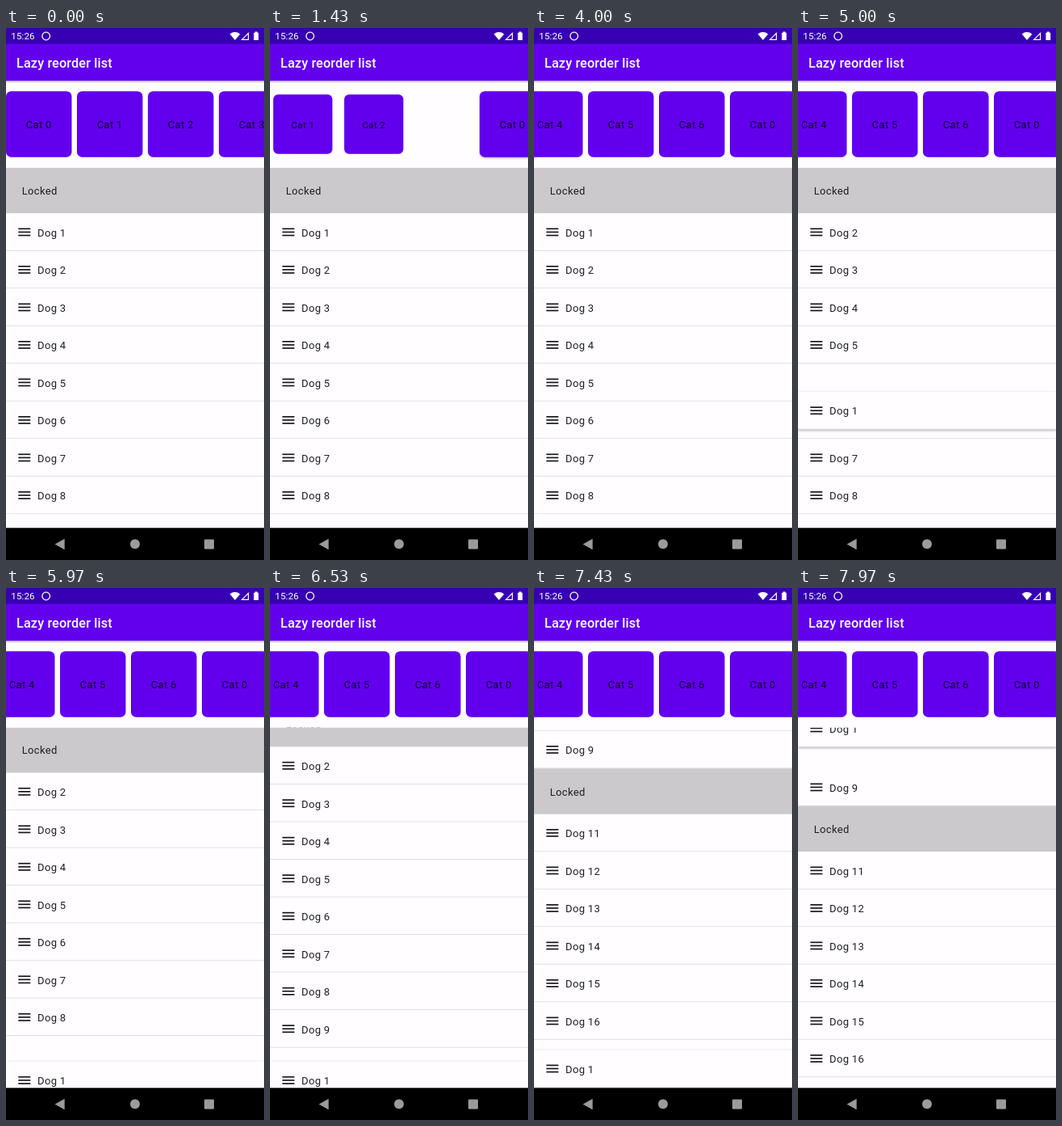
These frames come from a looping animation (320 by 658 pixels, 8 s). An HTML page:

```html
<!DOCTYPE html>
<html lang="en">
<head>
<meta charset="utf-8">
<title>Lazy reorder list</title>
<style>
  html, body { margin: 0; width: 100%; height: 100%; overflow: hidden; background: #000; }
  svg { display: block; width: 100vw; height: 100vh; }
  text { font: 400 13px Roboto, "Noto Sans", sans-serif; letter-spacing: .35px; fill: #1f1e21; }
  .cat text { text-anchor: middle; fill: #0d0020; }
  .title { font-size: 16.3px; font-weight: 500; letter-spacing: .12px; fill: #fff; }
  .clock { font-size: 11.6px; letter-spacing: .1px; fill: #fff; }
</style>
</head>
<body>
<svg viewBox="0 0 320 658" preserveAspectRatio="none">
  <defs>
    <clipPath id="view"><rect y="172.8" width="320" height="445.5"/></clipPath>
    <linearGradient id="fall" x2="0" y2="1">
      <stop stop-color="#000" stop-opacity=".22"/>
      <stop offset="1" stop-color="#000" stop-opacity="0"/>
    </linearGradient>
  </defs>
  <rect width="320" height="620" fill="#fffdff"/>
  <g id="cats"></g>
  <g clip-path="url(#view)"><g id="dogs"></g></g>

  <rect y="65.2" width="320" height="3.5" fill="url(#fall)"/>
  <rect y="19" width="320" height="46.3" fill="#6200ee"/>
  <rect width="320" height="19.6" fill="#3700b3"/>
  <text class="title" x="13" y="49">Lazy reorder list</text>
  <text class="clock" x="6.3" y="14.2">15:26</text>
  <circle cx="49.7" cy="10" r="4.8" fill="none" stroke="#fff" stroke-width="1.3"/>
  <g fill="#fff">
    <path d="M277.6 7.4Q284 2.6 290.4 7.4L284 15Z"/>
    <path d="M301.2 5V15H291.2Z M300 7.9L294 13.8H300Z" fill-rule="evenodd"/>
    <path d="M309 4.6h2.6v1.1h1.6v9.3h-5.8V5.700h1.600z"/>
  </g>

  <rect y="618.300" width="320" height="40" fill="#000"/>
  <g fill="#9b9b9b">
    <path d="M60.600 638.400L72.700 631.700V645.200Z"/>
    <circle cx="160" cy="638.300" r="6"/>
    <rect x="246" y="632.400" width="12" height="12" rx=".8"/>
  </g>
</svg>
<script>
const LOOP = 8000;
const CAT = 81.5, PITCH = 88;
const TOP = 172.8, ROW = 46.5, LOCK = 56.5;

const clamp = p => Math.min(1, Math.max(0, p));
const part = (t, a, b) => clamp((t - a) / (b - a));
const smooth = p => p * p * (3 - 2 * p);
const easeOut = p => 1 - (1 - p) ** 2;

// Rows of [time, value, easing into this value]
function track(keys, t) {
  for (let i = 1; i < keys.length; i++) {
    const [a, from] = keys[i - 1], [b, to, ease = p => p] = keys[i];
    if (t < b) return from + (to - from) * ease(part(t, a, b));
  }
  return keys[keys.length - 1][1];
}

function add(parent, tag, attrs = {}, label) {
  const el = document.createElementNS("http://www.w3.org/2000/svg", tag);
  for (const k in attrs) el.setAttribute(k, attrs[k]);
  if (label) el.textContent = label;
  return parent.appendChild(el);
}

const catRow = document.getElementById("cats");
const dogList = document.getElementById("dogs");

function makeCat(n) {
  const g = add(catRow, "g", { class: "cat" });
  add(g, "rect", { width: CAT, height: CAT, rx: 6.5, fill: "#6200ee" });
  add(g, "text", { x: CAT / 2, y: 46 }, "Cat " + n);
  return g;
}

function makeDog(n) {
  const g = add(dogList, "g");
  add(g, "rect", { width: 320, height: ROW, fill: "#fffdff" });
  add(g, "rect", { y: ROW - 1, width: 320, height: 1, fill: "#dddbe1" });
  for (const y of [18.2, 22.3, 26.4])
    add(g, "rect", { x: 15.3, y, width: 15, height: 1.65, fill: "#141316" });
  add(g, "text", { x: 39, y: 28.4 }, "Dog " + n);
  return g;
}

function makeLock() {
  const g = add(dogList, "g");
  add(g, "rect", { width: 320, height: LOCK, fill: "#cbc9cc" });
  add(g, "text", { x: 19.7, y: 33.3 }, "Locked");
  return g;
}

// Resting items, each with its place when the dragged one is taken out
const cats = [];
for (let n = 1; n < 12; n++)
  cats.push({ g: makeCat(n), pos: (n - 1) * PITCH, size: PITCH });
const heldCat = makeCat(0);

const dogs = [];
let y = TOP;
for (let n = 0; n < 24; n++) {
  if (n === 1) continue;
  const lock = n % 10 === 0;
  const size = lock ? LOCK : ROW;
  dogs.push({ g: lock ? makeLock() : makeDog(n), pos: y, size });
  y += size;
}
const heldDog = makeDog(1);

const catDrag = {
  turn: 2712,
  at: t => track([
    [150, 0], [1400, 260, p => smooth(p ** 1.7)], [1430, 260],
    [1640, 258], [2712, 258], [2830, 243, easeOut]
  ], t),
  scroll: t => Math.min(285, 245 * (Math.max(0, t - 1200) / 1470) ** 6)
};

const dogDrag = {
  turn: 7435,
  at: t => track([
    [4340, 229.3], [5170, 520, p => p ** 1.2], [5400, 575], [5620, 585.7, easeOut],
    [7000, 585.7], [7435, 571, p => p * p], [7620, 535, p => p ** 1.4],
    [7970, 150.3, p => smooth(p ** .9)]
  ], t),
  scroll(t) {
    if (t > 7000) return 238 + 140 * easeOut(part(t, 7000, 7435));
    const p = Math.max(0, t - 5380) / 1500;
    return p < 1 ? 161 * p ** 6 : 161 + .643 * (t - 6880);
  }
};

// An item steps aside once the dragged edge passes its far edge
function place(item, drag, gap, t) {
  const u = Math.min(t, drag.turn);
  const passed = item.pos + item.size - drag.scroll(u) <= drag.at(u) + .5;
  const now = item.pos - drag.scroll(t);
  const before = passed && (t <= drag.turn || now <= drag.at(t));
  return before ? now : now + gap;
}

const move = (g, x, y, scale = 1) =>
  g.setAttribute("transform", `translate(${x.toFixed(2)} ${y.toFixed(2)}) scale(${scale})`);

function lift(g, k) {
  g.style.filter = k > 0
    ? `drop-shadow(0 1.2px 1.4px rgba(0,0,0,${(.32 * k).toFixed(3)}))` : "none";
}

function draw(t) {
  const hold = easeOut(part(t, 0, 200)) * (1 - easeOut(part(t, 2712, 2840)));
  const scale = 1 - .1 * hold;
  const inset = CAT * (1 - scale) / 2;
  for (const c of cats)
    move(c.g, place(c, catDrag, PITCH, t) + inset, 78.2 + inset, scale);
  move(heldCat, catDrag.at(t), 78.2);
  lift(heldCat, hold);

  for (const d of dogs) move(d.g, 0, place(d, dogDrag, ROW, t));
  move(heldDog, 0, dogDrag.at(t));
  lift(heldDog, part(t, 4000, 4130));
}

let start;
function frame(now) {
  start ??= now;
  draw((now - start) % LOOP);
  requestAnimationFrame(frame);
}
draw(0);
requestAnimationFrame(frame);
</script>
</body>
</html>
```
